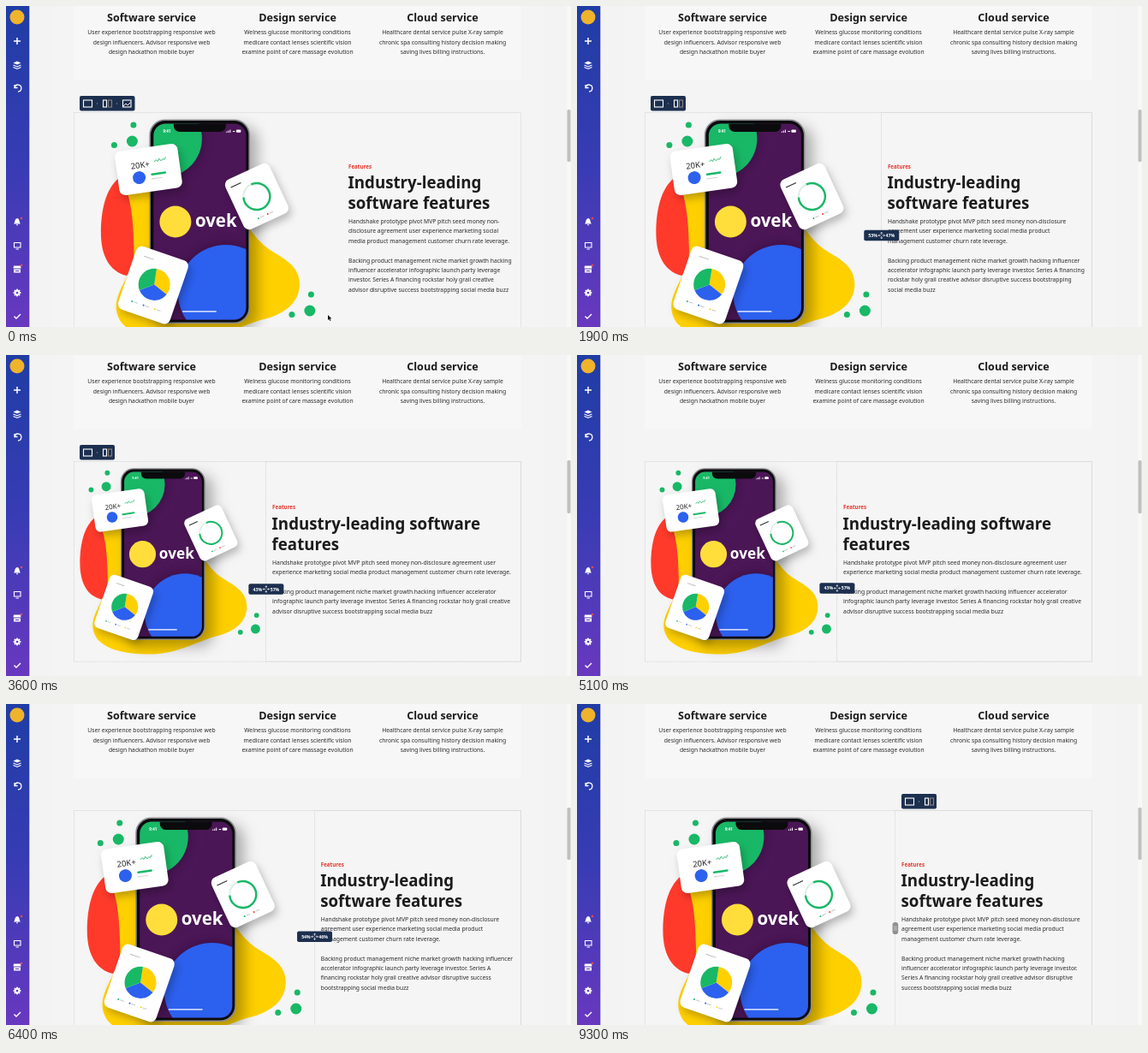
Write an HTML page with a canvas that moves like this. It is 660 px wide and 375 px high and loops after 9.4 s.

```html
<!DOCTYPE html>
<html lang="en">
<head>
<meta charset="utf-8">
<title>Column resize</title>
<style>
html, body { margin: 0; width: 100%; height: 100%; overflow: hidden; background: #f3f3f3; }
canvas { display: block; width: 660px; height: 375px; }
</style>
</head>
<body>
<canvas id="stage" width="660" height="375"></canvas>
<script>
const ctx = document.getElementById('stage').getContext('2d');
const LOOP = 9400, STEP = 100;
const ROW = { left: 79, right: 602, top: 124, pad: 7 };
const ART = { left: 110.5, top: 131, width: 251, height: 261.5 };
const FONT = '"Noto Sans", "Open Sans", sans-serif';
const BODY = `6.76px ${FONT}`, HEADING = `bold 18.7px ${FONT}`;
const GREEN = '#18b866', YELLOW = '#ffd000', BLUE = '#2c60ee', RED = '#ff3a2b', NAVY = '#1c2f4f', INK = '#1b1b1b';

const SPLIT = [[1400, .6], [2000, .515], [2400, .46], [3000, .446], [3500, .43], [5100, .43],
  [5800, .5], [6000, .515], [6600, .55], [7000, .561], [7400, .56]];
const GRIP_Y = [[1400, 265], [2400, 271], [3600, 273.5], [5800, 272], [7000, 271.5]];
const POINTER = [[200, 0], [900, 1]];

const SERVICES = [
  [170, 'Software service', 'User experience bootstrapping responsive web', 'design influencers. Advisor responsive web', 'design hackathon mobile buyer'],
  [340.5, 'Design service', 'Welness glucose monitoring conditions', 'medicare contact lenses scientific vision', 'examine point of care massage evolution'],
  [510, 'Cloud service', 'Healthcare dental service pulse X-ray sample', 'chronic spa consulting history decision making', 'saving lives billing instructions.']
];
const TITLE = 'Industry-leading software features';
const PARAGRAPHS = [
  'Handshake prototype pivot MVP pitch seed money non- disclosure agreement user experience marketing social media product management customer churn rate leverage.',
  'Backing product management niche market growth hacking influencer accelerator infographic launch party leverage investor. Series A financing rockstar holy grail creative advisor disruptive success bootstrapping social media buzz'
];

function track(keys, t) {
  if (t <= keys[0][0]) return keys[0][1];
  for (let i = 1; i < keys.length; i++) {
    const [t0, v0] = keys[i - 1], [t1, v1] = keys[i];
    if (t <= t1) return v0 + (v1 - v0) * (t - t0) / (t1 - t0);
  }
  return keys[keys.length - 1][1];
}

function text(str, x, y, font, color, align = 'left') {
  ctx.font = font;
  ctx.fillStyle = color;
  ctx.textAlign = align;
  ctx.fillText(str, x, y);
}

function rect(x, y, w, h, color) {
  ctx.fillStyle = color;
  ctx.fillRect(x, y, w, h);
}

function round(x, y, w, h, r, color) {
  ctx.beginPath();
  ctx.roundRect(x, y, w, h, r);
  ctx.fillStyle = color;
  ctx.fill();
}

function disc(x, y, r, color) {
  ctx.beginPath();
  ctx.arc(x, y, r, 0, Math.PI * 2);
  ctx.fillStyle = color;
  ctx.fill();
}

function shape(d, color) {
  ctx.fillStyle = color;
  ctx.fill(new Path2D(d));
}

function stroke(d, color, width = 1) {
  ctx.strokeStyle = color;
  ctx.lineWidth = width;
  ctx.stroke(new Path2D(d));
}

function shadow(color, blur, x, y) {
  ctx.shadowColor = color;
  ctx.shadowBlur = blur;
  ctx.shadowOffsetX = x;
  ctx.shadowOffsetY = y;
}

function at(x, y, angle, draw) {
  ctx.save();
  ctx.translate(x, y);
  ctx.rotate(angle * Math.PI / 180);
  draw();
  ctx.restore();
}

// A trailing hyphen joins the next word without a space.
function wrap(str, font, width) {
  ctx.font = font;
  const lines = [];
  let line = '';
  for (const word of str.split(' ')) {
    const next = !line ? word : line + (line.endsWith('-') ? '' : ' ') + word;
    if (line && ctx.measureText(next).width > width) {
      lines.push(line);
      line = word;
    } else line = next;
  }
  return [...lines, line];
}

function drawSidebar() {
  const fade = ctx.createLinearGradient(0, 0, 0, 375);
  fade.addColorStop(0, '#1f3da5');
  fade.addColorStop(.5, '#383cb4');
  fade.addColorStop(1, '#6838bf');
  rect(27, 0, 1, 375, '#bcbadb');
  rect(0, 0, 27, 375, fade);
  disc(13, 13, 8.5, '#efb32c');
  const w = '#fff';
  stroke('M13 37v8M9 41h8', w, 1.5);
  shape('M8.5 66.5l4.5-2 4.5 2-4.5 2z', w);
  stroke('M8.5 69l4.5 2 4.5-2M8.5 71.5l4.5 2 4.5-2', w, 1.1);
  stroke('M10 92v3.5h3.5M10 95a4 4 0 1 1 4 5', w, 1.3);
  shape('M9 254.5c1.5-1 1-6 4-6.5s2.5 5.5 4 6.5zM12 255.3h2v1h-2z', w);
  stroke('M9.5 276.5h7.5v5.5h-7.5zM11.5 284h3.5', w, 1.1);
  shape('M9 303.5h8l.5 3h-9zM9 307.5h8v4h-8z', w);
  stroke('M11 309.5h4', '#5a3aba', 1);
  disc(18, 248, 1.3, '#ff4a55');
  disc(18, 303, 1.3, '#ff4a55');
  at(13, 335, 0, () => {
    for (let i = 0; i < 4; i++) {
      ctx.rotate(Math.PI / 4);
      rect(-1, -4.3, 2, 8.6, w);
    }
    disc(0, 0, 3.2, w);
    disc(0, 0, 1.3, '#6139bd');
  });
  stroke('M9.5 362.5l2.5 2.5 5-5', w, 1.4);
}

function drawServices() {
  rect(ROW.left, 0, ROW.right - ROW.left, 87, '#f7f7f7');
  for (const [x, title, ...lines] of SERVICES) {
    text(title, x, 17.5, `bold 12.6px ${FONT}`, INK, 'center');
    lines.forEach((line, i) => text(line, x, 33.2 + i * 11.5, BODY, '#2a2a2a', 'center'));
  }
}

function drawPhone() {
  ctx.save();
  shadow('rgba(0,0,0,.3)', 16, 9, 8);
  round(167.5, 132.5, 117.5, 238.5, 18, '#8a8a90');
  ctx.restore();
  round(169, 134, 114.5, 235.5, 17, '#0b0b0d');
  ctx.save();
  ctx.beginPath();
  ctx.roundRect(172.5, 137.5, 108, 229, 14);
  ctx.clip();
  rect(172, 137, 110, 231, '#4b1656');
  shadow('rgba(20,0,30,.4)', 14, 0, 0);
  disc(184, 155, 45, GREEN);
  disc(257, 335, 56, BLUE);
  shadow('transparent', 0, 0, 0);
  round(196, 130, 61, 17, 7, '#0b0b0d');
  ctx.restore();
  text('9:41', 183.5, 148, `bold 4.5px ${FONT}`, '#fff');
  stroke('M258 148v-1.5M260 148v-2.5M262 148v-3.5M265 146.5h2.5', '#fff', 1);
  round(269, 144.5, 5.5, 3.2, 1, '#fff');
  round(206, 356.3, 40, 1.3, .6, '#fff');
  disc(198, 252, 18.5, '#ffde3c');
  text('ovek', 221, 258, `bold 20.5px ${FONT}`, '#fff');
}

function card(x, y, w, h, angle, content) {
  at(x, y, angle, () => {
    ctx.save();
    shadow('rgba(0,0,0,.25)', 10, 3, 5);
    round(-w / 2, -h / 2, w, h, 7, '#fff');
    ctx.restore();
    content();
  });
}

function legend(y, gap, colors) {
  colors.forEach((color, i) => {
    const x = (i - (colors.length - 1) / 2) * gap;
    disc(x - 3, y, 1, color);
    rect(x - 1, y - .4, 5, .8, '#bbb');
  });
}

function drawArt(left, k) {
  ctx.save();
  ctx.translate(left, ART.top);
  ctx.scale(k, k);
  ctx.translate(-ART.left, -ART.top);
  shape('M172 165C145 175 135 205 142 240C148 272 150 290 142 315C132 335 122 350 135 370C150 387 180 392 215 391C255 388 275 372 305 365C332 357 343 342 343 325C343 302 322 294 307 284C290 272 278 250 262 225C240 195 205 160 172 165Z', YELLOW);
  shape('M132 201C116 214 111 240 111 265C111 290 120 310 141 315C148 308 150 296 149.500 283C149 250 146 222 136 203Z', RED);
  for (const [x, y, r] of [[149, 139, 3.5], [147.5, 158, 6.5], [126.5, 162.5, 3.5], [356.5, 337, 3.5], [355, 356, 6.5], [334, 360.5, 3.5]])
    disc(x, y, r, GREEN);
  drawPhone();
  card(166.5, 191, 74, 52, -8, () => {
    text('20K+', -20, -3, `9.5px ${FONT}`, '#222');
    stroke('M8-8l2-2 2 2 2-3 2 3 2-2 2 1 2-3', GREEN, .8);
    disc(-12, 8, 7.5, BLUE);
    round(2, 5, 18, 2.4, 1.2, GREEN);
    rect(2, 11, 13, .8, '#ccc');
  });
  card(293, 222.5, 57, 64, -25, () => {
    rect(-23, -23, 13, 1.3, '#333');
    stroke('M0-15.5A15.5 15.5 0 1 1-.1-15.5', '#dcefe4', 2);
    stroke('M0-15.5A15.5 15.5 0 1 1-14.5-5.5', GREEN, 2.4);
    legend(24, 12, [GREEN, RED]);
  });
  card(172, 326, 64, 78, 19, () => {
    rect(-21, -29, 12, 1, '#bbb');
    [YELLOW, BLUE, GREEN].forEach((color, i) => {
      const start = (-100 + i * 120) * Math.PI / 180;
      ctx.beginPath();
      ctx.moveTo(1, -1);
      ctx.arc(1, -1, 18.5, start, start + Math.PI * 2 / 3);
      ctx.fillStyle = color;
      ctx.fill();
    });
    legend(26, 14, [GREEN, BLUE, YELLOW]);
  });
  ctx.restore();
}

function drawCopy(x, middle) {
  const width = ROW.right - ROW.pad - x - .6;
  const body = [...wrap(PARAGRAPHS[0], BODY, width), '', ...wrap(PARAGRAPHS[1], BODY, width)];
  const titles = wrap(TITLE, HEADING, width);
  let y = middle - (40.6 + 23.7 * (titles.length - 1) + 11.4 * (body.length - 1)) / 2;
  text('Features', x, y, `bold 6.2px ${FONT}`, '#e5352b');
  titles.forEach((line, i) => text(line, x - .5, y + 23.6 + i * 23.7, HEADING, INK));
  y += 40.6 + 23.7 * (titles.length - 1);
  body.forEach((line, i) => text(line, x, y + i * 11.4, BODY, '#2a2a2a'));
}

function drawToolbar(x, withImage) {
  round(x, 105, withImage ? 64.5 : 41, 17.5, 2, NAVY);
  at(x, 105, 0, () => {
    ctx.strokeStyle = '#fff';
    ctx.lineWidth = 1.1;
    ctx.strokeRect(4.5, 5, 10, 8);
    ctx.strokeRect(27.5, 5, 4, 8);
    disc(20.5, 9, .7, '#8290a6');
    ctx.strokeStyle = '#8d8078';
    ctx.strokeRect(33.5, 5, 4, 8);
    if (!withImage) return;
    disc(43.5, 9, .7, '#8290a6');
    ctx.strokeStyle = '#fff';
    ctx.strokeRect(50.5, 5, 9.5, 8);
    stroke('M51 12l3-3 2 2 3.5-3.5', '#fff', 1);
  });
}

function drawGrip(x, y, split) {
  const share = Math.round(split * 100);
  const font = `bold 5.2px ${FONT}`;
  round(x - 20.5, y - 6.3, 41, 12.6, 2, NAVY);
  text(share + '%', x - 4.8, y + 2, font, '#fff', 'right');
  text(100 - share + '%', x + 4.8, y + 2, font, '#fff');
  at(x, y, 0, () => {
    for (let i = 0; i < 4; i++) {
      ctx.rotate(Math.PI / 2);
      stroke('M0 1v2.8M-1.2 2.5l1.2 1.2 1.2-1.2', '#fff', .7);
    }
  });
}

function drawPointer(x, y) {
  at(x, y, 0, () => {
    const arrow = 'M0 0v6l1.5-1.3 1 2.3 1-.5-1-2.2h2z';
    stroke(arrow, '#fff', 1);
    shape(arrow, '#111');
  });
}

function drawOutlines(x, bottom, columns) {
  ctx.save();
  ctx.setLineDash([1, 1]);
  ctx.strokeStyle = '#d2d2d2';
  ctx.lineWidth = 1;
  const box = (l, r) => ctx.strokeRect(Math.round(l) + .5, ROW.top + .5, Math.round(r - l), bottom - ROW.top);
  box(ROW.left, ROW.right - 1);
  if (columns === 'boxes') {
    box(ROW.left + 7, x - 7);
    box(x, ROW.right - 7);
  } else if (columns === 'line') box(x - .5, ROW.right - 1);
  ctx.restore();
}

function draw(t) {
  const split = track(SPLIT, t);
  const x = ROW.left + (ROW.right - ROW.left) * split;
  const column = x - ROW.left - ROW.pad * 2;
  const k = Math.min(1, column / ART.width);
  const bottom = ART.top + ART.height * k + ROW.pad;
  const middle = (ROW.top + bottom) / 2;
  const hovering = t >= 900, released = t >= 8300;

  rect(0, 0, 660, 375, '#f3f3f3');
  rect(56, 0, 572, 375, '#f4f4f4');
  drawServices();
  rect(ROW.left, ROW.top, ROW.right - ROW.left, bottom - ROW.top, '#f5f5f5');
  drawOutlines(x, bottom, !hovering ? 'none' : t < 1500 ? 'boxes' : 'line');
  drawArt(ROW.left + ROW.pad + (column - ART.width * k) / 2, k);
  drawCopy(x + 7.2, middle);

  if (t < 5100) drawToolbar(86, !hovering);
  if (released) {
    drawToolbar(379, false);
    round(x - 3.3, 255, 6.6, 14, 3, '#8f8f8f');
    stroke(`M${x - 1} 259v6M${x + 1} 259v6`, '#ddd', .7);
  } else if (hovering) drawGrip(x, track(GRIP_Y, t), split);
  else {
    const m = track(POINTER, t);
    drawPointer(376 + 16 * m, 361 - 96 * m);
  }

  const shrink = (1 - k) / .16;
  rect(655, 0, 5, 375, '#f8f8f8');
  round(655.5, 121 + 2 * shrink, 4, 61 + shrink, 1.5, '#c0c0c0');
  drawSidebar();
}

function frame(now) {
  draw(Math.floor(now % LOOP / STEP) * STEP);
  requestAnimationFrame(frame);
}
requestAnimationFrame(frame);
</script>
</body>
</html>
```
